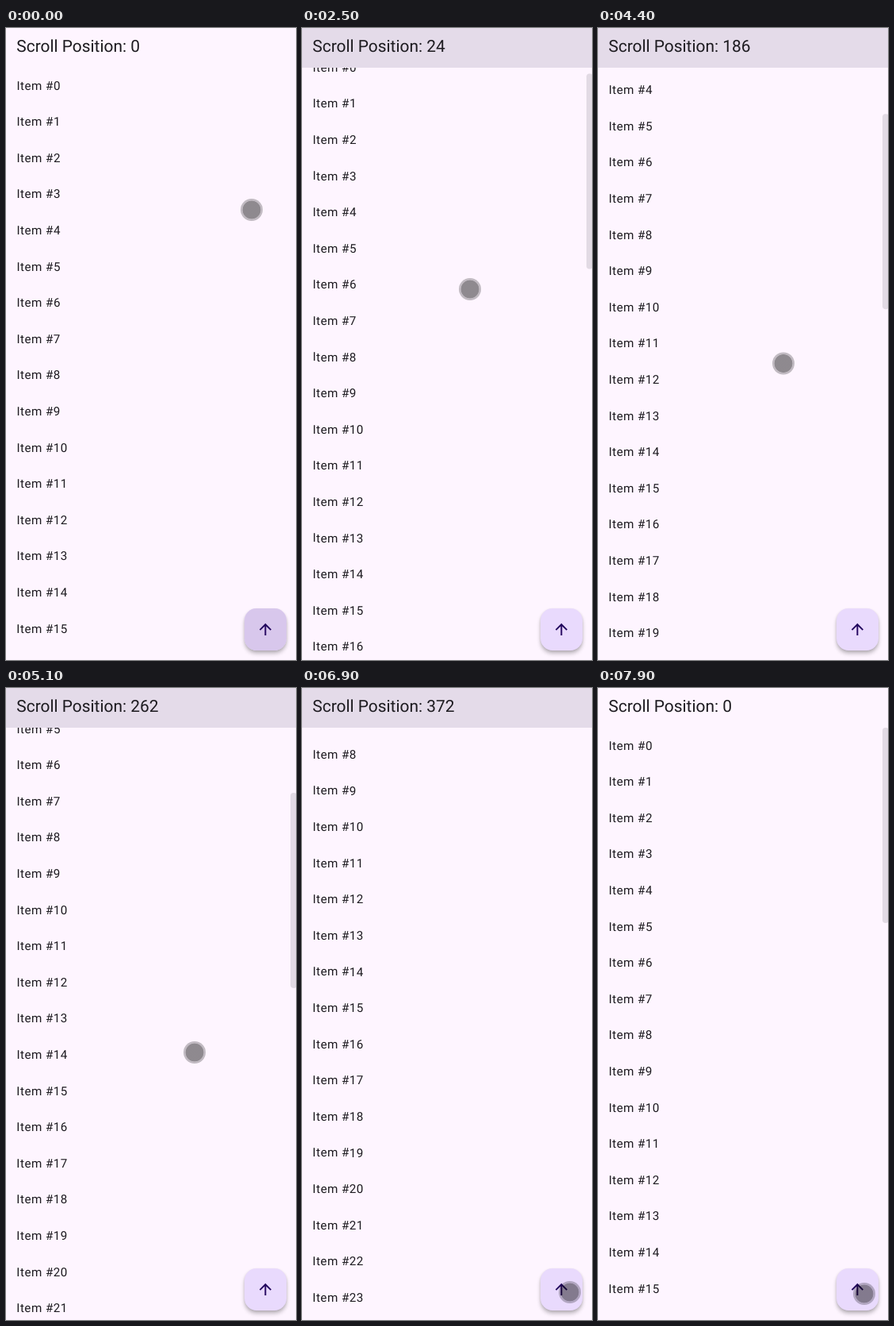
Animation, 366 px wide and 796 px high, one loop 8000 ms. Source, as an HTML page:

```html
<!DOCTYPE html>
<html lang="en">
<head>
<meta charset="utf-8">
<title>Scroll position</title>
<style>
  html, body { margin: 0; width: 100%; height: 100%; overflow: hidden; }
  body { position: relative; background: #fef5ff; }
  #page {
    position: absolute;
    inset: 0;
    width: 100%; height: 100%;
    fill: #1d1b20;
    font-family: Roboto, sans-serif;
    text-rendering: geometricPrecision;
  }
  #list { font-size: 15.2px; letter-spacing: .475px; }
  #title { font-size: 20.9px; }
  #bar { fill: #fef5ff; }
  #bar.scrolled { fill: #e4dbe9; }
  #thumb {
    position: absolute;
    top: 50px; left: 359.3px;
    width: 7.6px; height: 246px;
    border-radius: 3.8px;
    background: rgba(29, 27, 32, .12);
  }
  #fab {
    position: absolute;
    left: 300.8px; top: 730.6px;
    width: 53.2px; height: 53.2px;
    border-radius: 15.2px;
    background: #e9dafd;
    box-shadow: 0 4px 5px rgba(0, 0, 0, .24), 0 1px 3px rgba(0, 0, 0, .1);
  }
  #focus { position: absolute; inset: 0; border-radius: inherit; background: #d8c7ec; }
  #fab svg { position: absolute; left: 14.8px; top: 15.2px; width: 22.8px; height: 22.8px; fill: #21005d; }
  #pointer {
    position: absolute;
    left: -14px; top: -14px;
    width: 28px; height: 28px;
    border-radius: 50%;
    background: radial-gradient(circle, rgba(0, 0, 0, .44) 11px, rgba(0, 0, 0, .24) 11.7px);
  }
</style>
</head>
<body>
<svg id="page">
  <g id="list"></g>
  <rect id="bar" width="100%" height="50"/>
  <text id="title" x="13.3" y="30.4" transform="rotate(.01)"></text>
</svg>
<div id="thumb"></div>
<div id="fab">
  <div id="focus"></div>
  <svg viewBox="0 0 24 24"><path d="M4 12l1.41 1.41L11 7.83V20h2V7.83l5.58 5.59L20 12l-8-8-8 8z"/></svg>
</div>
<div id="pointer"></div>
<script>
const LOOP = 8000, TICK = 100, SCALE = 0.95, ROW = 48 * SCALE;
const [list, bar, title, thumb, focusTint, pointer] =
  ['list', 'bar', 'title', 'thumb', 'focus', 'pointer'].map(id => document.getElementById(id));

for (let i = 0; i < 30; i++) {
  const row = document.createElementNS('http://www.w3.org/2000/svg', 'text');
  row.setAttribute('x', 13.5);
  row.setAttribute('y', 77.5 + i * ROW);
  row.textContent = `Item #${i}`;
  list.append(row);
}

const nudges = [1300, 1700, 1800, 2500];
const pauses = [3200, 3500, 3600, 4000, 4700, 5700];

const ramp = (t, from, to) => Math.min(1, Math.max(0, (t - from) / (to - from)));
const ease = p => p * p * (3 - 2 * p);
const passed = (times, t) => times.filter(time => time <= t).length;

function draw(now) {
  const t = Math.floor(now % LOOP / TICK) * TICK;

  // The drag runs in three legs, counted in ticks without the pauses
  const ticks = (t - 2700) / TICK - passed(pauses, t);
  const a = ramp(ticks, 0, 7), b = ramp(ticks, 7, 19), c = ramp(ticks, 19, 27);

  const rewind = ease(ramp(t, 7200, 7850));
  const offset = (6 * passed(nudges, t) + 86 * a + 152 * b + 110 * c) * (1 - rewind);

  // The slight rotation keeps baselines from snapping to whole pixels
  list.setAttribute('transform', `translate(0 ${-offset * SCALE}) rotate(.01)`);
  title.textContent = `Scroll Position: ${Math.round(offset)}`;
  bar.classList.toggle('scrolled', offset > 0);

  thumb.style.transform = `translateY(${offset * 0.3125}px)`;
  thumb.style.opacity = t < 2500 ? 0 : 1 - ramp(t, 6600, 6900) + ramp(t, 7200, 7500);
  focusTint.style.opacity = 1 - ramp(t, 1600, 1800);

  const arrive = ease(ramp(t, 300, 1100)), swing = ease(ramp(t, 300, 850)), settle = ease(ramp(t, 850, 1100));
  const exit = ramp(t, 6200, 6500), reach = ramp(t, 6600, 6900), drift = ramp(t, 7100, 7900);
  const x = 310 - 126 * swing + 28 * settle + 18 * a + 8 * b + 7 * c + 46 * exit + 47 * reach - 2 * drift;
  const y = 229 + 100 * arrive + 57 * a + 73 * b + 77 * c + 214 * exit + 11 * reach + 2 * drift;
  pointer.style.transform = `translate(${x}px, ${y}px)`;
}

const start = performance.now();
function frame() {
  draw(performance.now() - start);
  requestAnimationFrame(frame);
}
frame();
</script>
</body>
</html>
```
